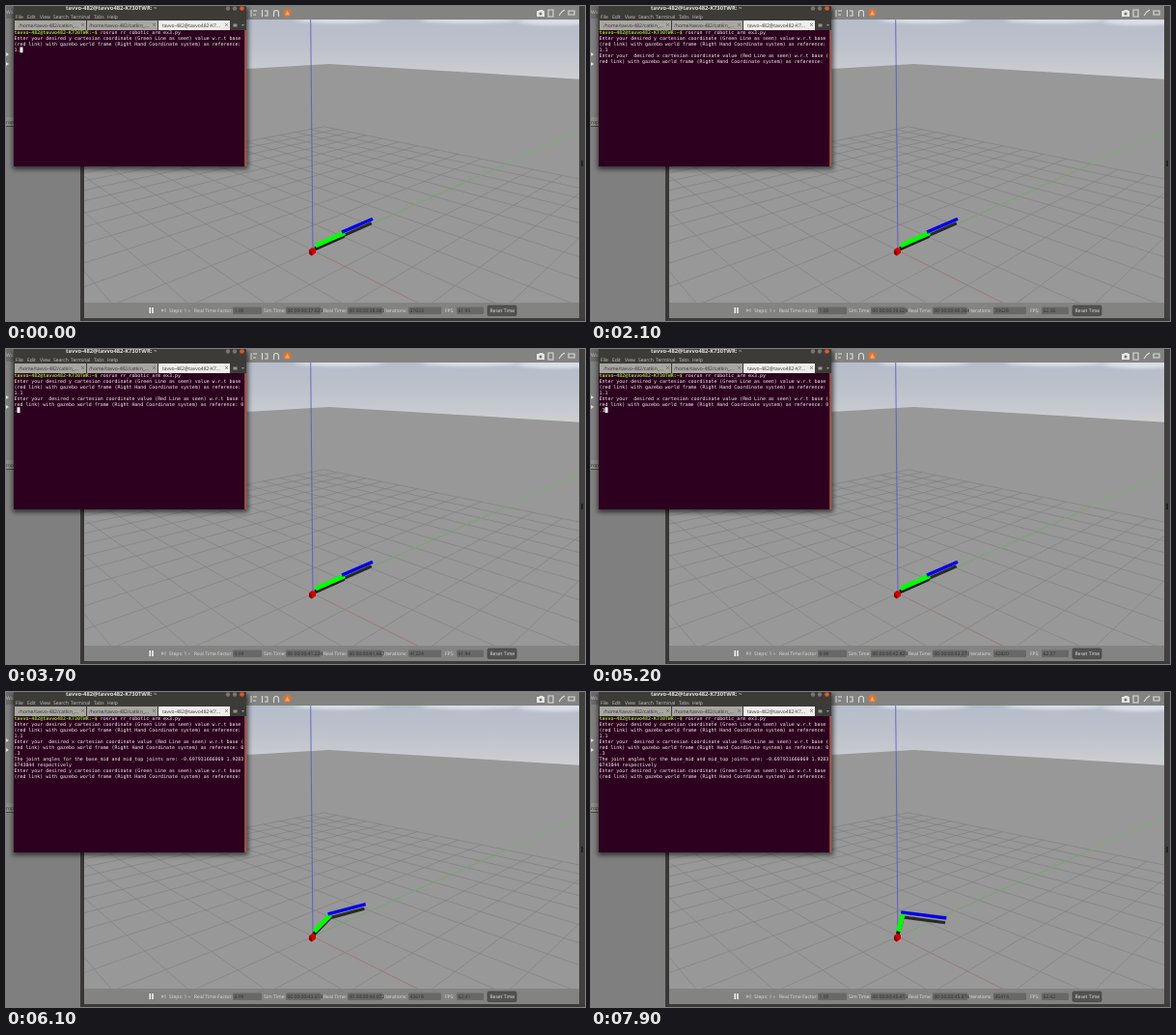
Animation, 600 px wide and 326 px high, one loop 8000 ms. Source, as an HTML page:

```html
<!DOCTYPE html>
<html lang="en">
<head>
<meta charset="utf-8">
<title>Robot arm simulation</title>
<style>
html, body { margin: 0; width: 100%; height: 100%; overflow: hidden; background: #3c3b39; }
svg { display: block; width: 600px; height: 326px; }
text { font: 5px "Open Sans", "Noto Sans", sans-serif; fill: #c9c7c2; white-space: pre; text-rendering: geometricPrecision; }
#rows text { font: 4.95px "DejaVu Sans Mono", monospace; fill: #f4f0f2; }
#rows .prompt { font-weight: bold; fill: #8ae234; }
#bar text { fill: #dedede; }
#bar .value, .dark { fill: #2c2c2c; }
.title { font-size: 5.8px; font-weight: bold; fill: #e2dfd8; }
</style>
</head>
<body>
<svg viewBox="0 0 600 326">
  <defs>
    <linearGradient id="sky" x2="0" y2="1">
      <stop offset="0" stop-color="#b6bdca"/>
      <stop offset=".4" stop-color="#bcc1cb"/>
      <stop offset="1" stop-color="#cfd0d2"/>
    </linearGradient>
    <clipPath id="view"><path d="M81 14H594V307H81z"/></clipPath>
    <filter id="soft" x="-20%" y="-100%" width="140%" height="300%"><feGaussianBlur stdDeviation="3 1.500"/></filter>
    <filter id="halo"><feGaussianBlur stdDeviation="2.5"/></filter>
  </defs>

  <!-- Left panel -->
  <path d="M0 0H78V326H0z" fill="#7f7f7f"/>
  <path d="M0 0H9V13H0z" fill="#6a6a69"/>
  <path d="M0 115H9V124H0z" fill="#8c8c8b"/>
  <path d="M0 124H9V125H0z" fill="#444"/>
  <text x="0" y="8">Wor</text>
  <text class="dark" x="0" y="122">rop</text>
  <path d="M0 48l3 2-3 2zM0 58l3 2-3 2z" fill="#ddd"/>
  <path d="M77 0H81V326H77z" fill="#393836"/>

  <!-- 3D view -->
  <g clip-path="url(#view)">
    <path d="M81 14H594V80H81z" fill="url(#sky)"/>
    <g fill="#e6e9ee" opacity=".75" filter="url(#soft)">
      <ellipse cx="345" cy="15" rx="45" ry="3"/>
      <ellipse cx="480" cy="15" rx="50" ry="3"/>
      <ellipse cx="570" cy="16" rx="40" ry="4"/>
    </g>
    <path id="ground" fill="#989898"/>
    <path id="grid" fill="none" stroke="#7b7b7b" stroke-width=".55"/>
    <path id="axisX" stroke="#b07272" stroke-width=".6"/>
    <path id="axisY" stroke="#6fb96f" stroke-width=".7"/>
    <path id="axisZ" stroke="#5252cc" stroke-width=".8"/>
    <g fill="none">
      <path id="shade1" stroke="#181818" stroke-width="4"/>
      <path id="shade2" stroke="#282828" stroke-width="3.2"/>
      <path id="link1" stroke="#0f0" stroke-width="4.8"/>
      <path id="link2" stroke="#00e" stroke-width="3.4"/>
    </g>
    <path d="M314 252.500l3-2.500 4 1.500v4l-4 3-3-2z" fill="#d00000"/>
    <path d="M314 252.500l3 2v4l-3-2z" fill="#860000"/>
  </g>

  <!-- Toolbars -->
  <path d="M81 0H594V14H81z" fill="#838382"/>
  <circle cx="291.500" cy="7" r="4.300" fill="#d57638"/>
  <path d="M289 9.500l2.500-5 2.500 5z" fill="#e6a878"/>
  <g fill="none" stroke="#dcdcda" stroke-width="1.100">
    <path d="M254 4v7M256 5h4M256 9h3M265.500 4v7M268 5h3v5h-3M277.500 11V7a2.500 2.500 0 0 1 5 0v4"/>
    <path d="M562 4h5v7h-5zM573 10l3-4 3-2M583 5h6v4h-6z"/>
  </g>
  <path d="M550 5h2l1-1h3l1 1h1v6h-8z" fill="#e6e6e4"/>
  <circle cx="554" cy="8" r="1.500" fill="#777"/>
  <path d="M594 0H600V326H594z" fill="#41403e"/>
  <path d="M596 160h2v6h-2z" fill="#222"/>
  <path d="M81 307H594V323H81z" fill="#838382"/>
  <path d="M81 323H600V326H81z" fill="#3c3b39"/>
  <path d="M148.500 312h1.500v6h-1.500zM151.200 312h1.500v6h-1.500z" fill="#f4f4f4"/>
  <path d="M161 313l3 2-3 2zM164.500 313h1v4h-1z" fill="#b4b4b2"/>
  <g id="bar"></g>

  <!-- Terminal -->
  <path d="M7 2H251V169H7z" fill="#000" opacity=".6" filter="url(#halo)"/>
  <path d="M8 0H249V25H8z" fill="#3c3b37"/>
  <text class="title" x="62" y="4.200">tavvo-482@tavvo482-K730TWR: ~</text>
  <g fill="#77746d"><circle cx="230" cy="2.500" r="2.200"/><circle cx="237" cy="2.500" r="2.200"/></g>
  <circle cx="244.500" cy="2.500" r="2.300" fill="#e2562b"/>
  <g id="menu"></g>
  <path d="M9 15H83V25H9zM84 15H157V25H84z" fill="#a9a7a2"/>
  <path d="M158 15H232V25H158z" fill="#f0eeea"/>
  <text class="dark" x="13" y="21.500">/home/tavvo-482/catkin_…</text>
  <text class="dark" x="86" y="21.500">/home/tavvo-482/catkin_…</text>
  <text class="dark" x="162" y="21.500">tavvo-482@tavvo482-K7…</text>
  <path d="M78 18l3 3m0-3l-3 3M152 18l3 3m0-3l-3 3M227 18l3 3m0-3l-3 3" stroke="#555" stroke-width=".6"/>
  <path d="M235.500 18.500h4v3h-4zM244 19h3l-1.500 2z" fill="#96948f"/>
  <path d="M8 25H249V166H8z" fill="#2c001e"/>
  <path d="M247.200 25H249.500V166H247.200z" fill="#a4584c"/>
  <g id="rows"></g>
  <path id="cursor" fill="#fff"/>
</svg>
<script>
const $ = id => document.getElementById(id);

function addText(parent, x, y, str = '', cls = '') {
  const el = document.createElementNS('http://www.w3.org/2000/svg', 'text');
  el.setAttribute('x', x);
  el.setAttribute('y', y);
  el.setAttribute('class', cls);
  el.textContent = str;
  return parent.appendChild(el);
}

// Camera: vanishing points of the three axes and depth gained per metre
const U = -.0699, V = .0681, W = -.0281, HORIZON = 32;
const depth = (x, y, z = 0) => 1 + U * x + V * y + W * z;
function project([x, y, z = 0]) {
  const d = depth(x, y, z);
  return [(318 - 125 * U * x + 812 * V * y + 332 * W * z) / d,
          (253 + HORIZON * (U * x + V * y) + 1707 * W * z) / d].map(n => n.toFixed(2));
}
const line = (...pts) => 'M' + pts.map(project).join('L');
const draw = (id, d) => $(id).setAttribute('d', d);

// Cuts off the part of a ground line that lies behind the camera
function groundLine(a, b) {
  const near = .12, da = depth(...a), db = depth(...b);
  if (da < near && db < near) return '';
  const cut = (p, q, dp, dq) => dp >= near ? p :
    p.map((n, i) => n + (q[i] - n) * (near - dp) / (dq - dp));
  return line(cut(a, b, da, db), cut(b, a, db, da));
}

let grid = '';
for (let i = -10; i <= 10; i++)
  grid += groundLine([i, -10], [i, 10]) + groundLine([-10, i], [10, i]);
draw('grid', grid);
draw('ground', line([-50, -5], [-50, 50], [40, 50]) + 'L700 326L0 326z');
draw('axisX', line([0, 0], [4, 0]));
draw('axisY', line([0, 0], [0, 40]));
draw('axisZ', line([0, 0, 0], [0, 0, 5.8]));

// Piecewise linear value through [time, value] points
function track(keys, t) {
  const i = keys.findIndex(k => k[0] > t);
  if (i < 0) return keys[keys.length - 1][1];
  if (!i) return keys[0][1];
  const [t0, v0] = keys[i - 1], [t1, v1] = keys[i];
  return v0 + (v1 - v0) * (t - t0) / (t1 - t0);
}
const last = (list, t) => list.filter(e => e[0] <= t).pop();

const base = [[5250, 0], [6100, -.4], [6900, -.75], [7900, -.698]];
const mid = [[5250, 0], [6100, .62], [6900, 1.15], [7900, 1.77]];

function drawArm(t) {
  const a = track(base, t), b = a + track(mid, t);
  const at = (r, s, z) => [r * Math.sin(a) + s * Math.sin(b), r * Math.cos(a) + s * Math.cos(b), z];
  const shadow = ([x, y, z]) => [x - .3 * z, y + .05 * z, 0];
  const link1 = [at(.08, 0, .09), at(1.05, 0, .09)];
  const link2 = [at(1, -.05, .14), at(1, 1.1, .14)];
  draw('shade1', line(...link1.map(shadow)));
  draw('shade2', line(...link2.map(shadow)));
  draw('link1', line(...link1));
  draw('link2', line(...link2));
}

// Terminal contents
const askY = ['Enter your desired y cartesian coordinate (Green Line as seen) value w.r.t base',
  '(red link) with gazebo world frame (Right Hand Coordinate system) as reference:'];
const askX = ['Enter your  desired x cartesian coordinate value (Red Line as seen) w.r.t base (',
  'red link) with gazebo world frame (Right Hand Coordinate system) as reference: '];
const answer = ['The joint angles for the base_mid and mid_top joints are: -0.697931666069 1.9283',
  '6743844 respectively'];
const input1 = [[0, '1.'], [500, '1.1']];
const input2 = [[0, ''], [2700, '0'], [3200, '0.'], [4300, '0.3']];
const ENTER1 = 1400, ENTER2 = 5300, CHAR = 2.98, ROW = 5.95;

const rows = Array.from({ length: 11 }, (_, i) => addText($('rows'), 8.5, 29.3 + ROW * i));
addText($('rows'), 8.5, 29.3, 'tavvo-482@tavvo482-K730TWR:~$', 'prompt');
rows[0].textContent = ' '.repeat(30) + 'rosrun rr_robotic_arm ex3.py';

function drawTerminal(t) {
  const typed = last(input2, t)[1];
  const lines = [...askY, last(input1, t)[1]];
  if (t >= ENTER1) lines.push(askX[0], askX[1] + typed.slice(0, 1), typed.slice(1));
  if (t >= ENTER2) lines.push(...answer, ...askY);
  rows.slice(1).forEach((el, i) => el.textContent = lines[i] || '');

  const typing = t < ENTER1 || (typed && t < ENTER2);
  const x = 8.5 + CHAR * lines[lines.length - 1].length, y = 24.6 + ROW * lines.length;
  draw('cursor', typing ? `M${x} ${y}h3v5.8h-3z` : '');
}

['File', 'Edit', 'View', 'Search', 'Terminal', 'Tabs', 'Help'].forEach((s, i) =>
  addText($('menu'), [10, 22, 35, 49, 67, 91, 105][i], 12.7, s));

// Status bar
[[169, 'Steps: 1 ÷'], [195, 'Real Time Factor:'], [267, 'Sim Time:'], [329, 'Real Time:'],
  [392, 'Iterations:'], [455, 'FPS:']].forEach(([x, s]) => addText($('bar'), x, 317, s));
const fields = [[235, 30], [290, 36], [354, 36], [417, 34], [467, 28]].map(([x, w]) => {
  $('bar').insertAdjacentHTML('beforeend',
    `<rect x="${x}" y="311.500" width="${w}" height="7.500" rx="1" fill="#686867"/>`);
  return addText($('bar'), x + 1.5, 317, '', 'value');
});
$('bar').insertAdjacentHTML('beforeend',
  '<rect x="499" y="310" width="30" height="10.500" rx="1.500" fill="#525251" stroke="#3a3a3a" stroke-width=".6"/>');
addText($('bar'), 501.5, 317, 'Reset Time').style.fill = '#e8e6e2';

const factors = [[0, '1.00'], [2800, '0.99'], [7400, '1.00']];
const rates = [[0, '61.95'], [1000, '62.36'], [3000, '61.94'], [4600, '62.37'], [5800, '62.41'], [7400, '62.42']];

function drawStatus(t) {
  const s = Math.floor(t / 200) / 5, sim = 37.633 + .9975 * s;
  const clock = n => '00 00:00:' + n.toFixed(3);
  [last(factors, t)[1], clock(sim), clock(38.06 + 1.002 * s), (sim * 1000).toFixed(0), last(rates, t)[1]]
    .forEach((v, i) => fields[i].textContent = v);
}

const start = performance.now();
function frame() {
  const t = Math.floor((performance.now() - start) % 8000 / 100) * 100;
  drawArm(t);
  drawTerminal(t);
  drawStatus(t);
  requestAnimationFrame(frame);
}
frame();
</script>
</body>
</html>
```
